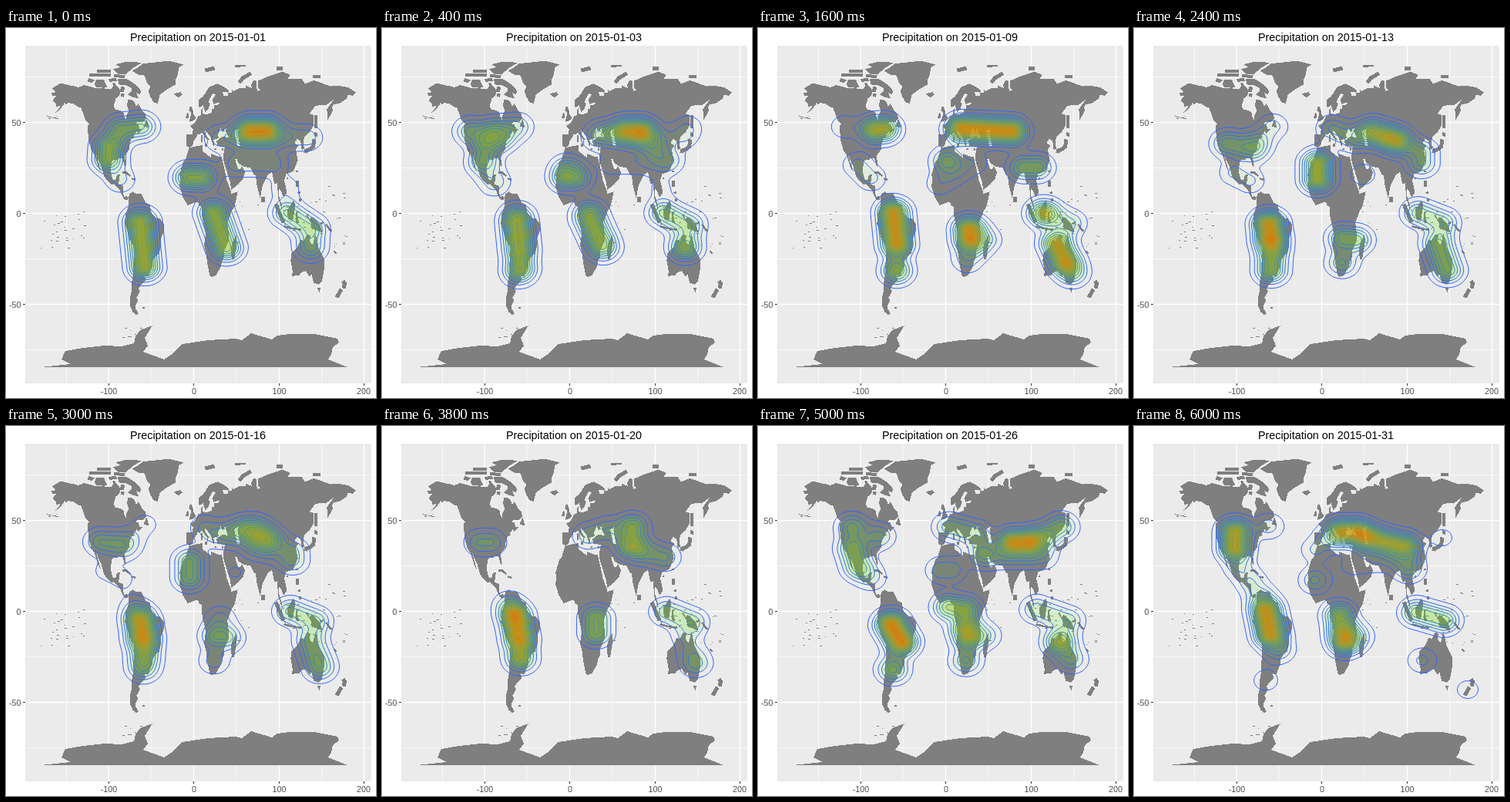
Write an HTML page with a canvas that moves like this. It is 480 by 480 pixels and loops after 6.2 s.

```html
<!DOCTYPE html>
<html lang="en">
<head>
<meta charset="utf-8">
<title>Daily precipitation</title>
<style>
html, body { margin: 0; width: 100%; height: 100%; overflow: hidden; background: #fff; }
svg, canvas { position: absolute; left: 0; top: 0; width: 480px; height: 480px; }
text { font-family: "Liberation Sans", Arial, sans-serif; }
.land { fill: #7f7f7f; shape-rendering: crispEdges; }
.sea { fill: #ebebeb; }
.isles { fill: none; stroke: #7f7f7f; shape-rendering: crispEdges; }
.isles path { vector-effect: non-scaling-stroke; }
.axis { font-size: 10.7px; fill: #4d4d4d; }
</style>
</head>
<body>
<svg viewBox="0 0 480 480">
  <rect x="25" y="23" width="449" height="438" fill="#ebebeb"/>
  <path d="M78.500 23V461M188 23V461M299 23V461M409.500 23V461M25 63.500H474M25 181.500H474M25 299.500H474M25 417.500H474" stroke="#fff" stroke-width=".7"/>
  <path d="M133 23V461M243.500 23V461M354.500 23V461M464.500 23V461M25 122.500H474M25 240.500H474M25 358.500H474" stroke="#fff" stroke-width="1.4"/>
  <path d="M133.500 461v3M243.500 461v3M354.500 461v3M464.500 461v3M22 122.500h3M22 240.500h3M22 358.500h3" stroke="#333"/>
  <g class="axis" text-anchor="middle">
    <text x="133.5" y="475">-100</text><text x="244" y="475">0</text>
    <text x="354.5" y="475">100</text><text x="464" y="475">200</text>
  </g>
  <g class="axis" text-anchor="end">
    <text x="19.5" y="126.5">50</text><text x="19.5" y="244.5">0</text><text x="19.5" y="363">-50</text>
  </g>
  <!-- land in degrees of longitude and latitude -->
  <g class="land" transform="matrix(1.105 0 0 -2.37 244 240.5)">
    <!-- Alaska -->
    <path d="M-140 69.7-145 70-156.5 71.3-163 69.5-166.5 68.4-162 66.4-168 65.7-166 64.5-161 64.4-164.5 63-166 61.5-162 60-162 58.6-157 58.7-158.5 57.5-164 54.7-158 56.5-154 59-151 61-151.5 59.2-148 60.5-140 59.8z"/>
    <!-- Canada -->
    <path d="M-141 69.7-136 69-129 70.2-115 68.5-108 68.5-97 68-96 69-94.5 70-96 71-94 72-91.5 70-88 68.5-87 67.3-85.5 69.5-82 69.5-81.5 68-83 66.3-86.5 66.3-88 64.5-92 62.8-94.5 58.7-92.500 57-88 56.500-82.500 55.200-82 53-80 51.300-79 54.300-76.500 56-78.500 58.800-78 62.400-74 62.300-70 61-68 58.500-65.500 60-64 59-61.500 56.500-57.500 54.500-56 52-60 50.200-66 50.200-69 48.500-70 47-123 47-123 49-127.500 51-130 54.500-133 58-136.500 58.300-141 59.800z"/>
    <!-- United States, Mexico, Central America -->
    <path d="M-70 48.5-65 49-64.5 46.2-60 46.3-65.5 43.6-66.5 44.5-67 45-70.5 43-70 41.8-74 40.6-76 37-75.7 35.3-81 32-81.3 30-80 26.8-80.4 25.2-81.7 26-84 30-89.5 30.2-89.3 29.2-91.5 29.5-94.5 29.5-97 28-97.7 22.3-96 19.2-94.500 18.200-92 18.600-90.500 21-87 21.500-88.800 15.900-83.300 15-83.700 11.500-82 9-79.500 9.500-77.300 8.500-78.200 7.500-80.500 7.300-83 8.400-87.500 12.900-94 16.200-97 15.800-101.500 17.700-105.500 20-109 25.700-114.800 31.700-109.500 23-112 24.700-116.800 32-120.500 34.500-124.300 40.500-124.600 48.300-122.500 49.500z"/>
    <!-- Arctic Canada, Greenland -->
    <path d="M-90 73.500-80 73.600-75 72.500-68 70.200-62 67-64 65-68 66-65 63-71 63.500-78 65-73 67-73 68.500-79 70-88 70.500zM-117 71-115 73-106 73.300-102 69-106 68.700-115 69.200zM-125 72-124 74.200-117 73-120 71.500zM-90 76.400-80 76.200-72 79.500-62 82.300-70 83.100-80 83-92 81.500-86 80-95 79z"/>
    <path d="M-73 78.2-66 79.8-60 82-45 82.7-30 83.5-12 81.5-18 80-19 76-22 73-22 70.5-33 67.5-40 65-43 60-48 61-51.5 64-53.5 67-51 69.5-55 71-58 75.5-66 76z"/>
    <!-- Iceland, Great Britain, Newfoundland -->
    <path d="M-24 65.5-16 66.4-13.7 65-18.5 63.4zM-5.500 50.100 1.300 51.200 1.600 52.700 0 53.500-2 57.600-3.200 58.600-5 58.500-6 56.500-3 54.700-4.500 53zM-10 52-6.300 52.200-6 54.500-8 55.200zM-59.300 47.600-55.800 51.500-53 47z"/>
    <!-- South America -->
    <path d="M-77.3 8.5-75.500 10.700-72 12-68 10.600-62 10.700-57 6-52 4.700-50 0-44.500-2.600-40-2.900-35-6-35-9-39-14-39-18-41-22-44.700-23.200-48.500-26-48.700-28.500-52.200-32.500-54-34.600-58-34-57-36.500-62.200-39-65-41-63.600-42.700-67.500-46-65.800-47.500-69-50.500-68.300-52.500-65.200-54.800-68-55.600-72-54-75-51-75.500-46.600-73-42-73.500-39-71.500-33-70.400-18.500-76-14-79.500-7.500-81.200-6-80.500-3-81-1-78.800 1.500-77 4z"/>
    <!-- Europe -->
    <path d="M5 62 5 59 7 58 10.5 59.3 13 55.4 16.5 57 18.7 60 17.2 61 18 62.5 22.3 65.8 25.3 65 21.4 62 23 59.900 28 60.500 38 60 38 64 34.800 64.400 33 66.600 40 66.200 41 67 36 69 28 71 18 69.300 12 65 10 63.800z"/>
    <path d="M41 64.7 41 46.8 35 46.2 36 45.2 34 44.4 31 46.600 28 43 29 41.200 22.700 40.300 24 38 22.800 36.600 19.400 41.800 13.700 45.200 12.300 45.200 12.500 44 18.400 40 16.800 40.300 15.700 38 15.800 40 10.300 43.500 8.800 44.400 6.500 43.100 3.200 43.200 3.200 41.900 0 40-2 36.800-5.500 36.100-8.900 37-9.200 43.100-1.800 43.400-1.200 46-4.700 48.200-1.500 48.700 1.500 50.200 5 53.200 8.500 53.700 8.200 56.500 10.500 57.600 10 54.700 14 54 21 55.200 21 57 24 57.200 23.500 59.200 28 59.500 36 64z"/>
    <!-- Northern Asia -->
    <path d="M40 66 44 66.2 44 68.4 46 66.800 53 68.500 60 68.500 61 69.800 68.500 68.500 66.800 70 70 73 72.800 72.800 74 67 78 67.500 75 68.800 75 72.500 87 75 104 77.600 113 75.800 110 73.800 127 73.400 130 71 141 72.800 160 69.600 170 69.800 181 69 190 66.200 186 64.400 181 65 178.500 62.600 170 60 164 59.800 162 57.800 163 56.200 156.700 51.100 156 57 164 62.400 155 59.300 142.500 59 135.500 54.700 140 53.800 140.300 48.300 135.500 44.300 131 42.800 129 41 41.500 41 37 45.200 38 47z"/>
    <!-- Middle East -->
    <path d="M41.5 43 41.5 41.5 33 42 26.2 39.500 27.500 37 36 36.500 34.200 31.200 35 28 39 22 42.700 16.500 43.400 12.800 52 16 57.500 19 59.700 22.500 56.300 26 54 24.200 51.500 24.500 48 29.800 50 30 52 27.600 58.500 25.500 66.500 25 69 43z"/>
    <!-- Southern and eastern Asia -->
    <path d="M66 43 66 25 70.500 20.800 72.700 21 73 17 77.600 8.100 80.200 15 87 21.300 91.500 22.600 94.300 16.100 97.500 16.500 98.500 11 99 8 103.500 1.400 103.400 4 99.300 10 100 13.300 102.500 12 105 8.700 109 11.500 106 18 108 21.500 116.500 23 121.800 29 119.300 35 122.500 37 118 38.500 121 40.800 125 39.600 126.500 34.500 129.300 35.500 128 39 130.500 43z"/>
    <!-- Africa, Madagascar -->
    <path d="M-6 35.8 3 36.8 10 37.3 10.2 34 15 32.3 19.5 30.5 20 32.7 29 31 32.3 31.2 37.3 21 38.500 18 43.200 12.200 44 10.700 51.200 11.900 48 4.500 44 1 39-5 40.700-11 40.500-15 35-21 35.500-24 32.800-26 31.500-29.200 25.500-34 20-34.800 18.400-34 15.300-27 14.400-22.500 11.800-17.500 13.700-11 9-1 9.500 3.500 6 4.300 4.500 6.300 1 6-7.500 4.400-13.300 9-17 14.700-16.200 19-17 21.200-13 27.800-9.800 29.800z"/>
    <path d="M44-17 49.3-12 50.3-15.500 47.200-25 44.500-25 43.400-22z"/>
    <!-- Borneo, Sulawesi, New Guinea -->
    <path d="M109 1.500 116.500 7 119 5 116-4 110.500-3zM119-3 120 .8 125 1.500 121 0 123-5 120.300-5.600zM131-1 134-.8 135-3.300 138-1.700 147.500-6 150.700-10.500 138-8.300 138-5.700z"/>
    <!-- Australia, Tasmania -->
    <path d="M114-22 122-18 125-14.500 129-14.900 132.600-11.400 136.700-12.200 135.500-15 139.300-17.500 142.400-10.800 146.300-19 153-25.300 153.400-29 150-37.400 146.500-39 140.500-38 137.800-33 135.700-34.800 131-31.500 126-32.300 123.500-33.900 115-34.300 115.700-31.700 113.500-26zM144.700-40.800 148.300-40.900 147-43.500z"/>
    <path class="sea" d="M47 45 53 46.600 51 44.500 54 37 50.500 37 49 41z"/>
  </g>
  <!-- long narrow islands, drawn as strokes -->
  <g class="isles" transform="matrix(1.105 0 0 -2.37 244 240.5)">
    <path stroke-width="5" d="M131 33 131.500 34.300 136 35.200 140 36.500 141 40.500M141 43.300 145 43.200M175 -37 177 -38.500 175.500 -41M173 -41.500 167.500 -46M96 5 105 -5M53 71.500 57 74 67 76.700M13 78.300 24 79.500M97 79.300 104 79.300M80.700 9 80.700 6.300"/>
    <path stroke-width="4" d="M-123 75.800-98 75.700M-94 75.200-81 75M-100 72.700-91 73.400M-114 78-98 78M-86 64.800-82 64.500M121 18 121.500 14.500M123 7.500 126 7.500M139 75 148 75M142.800 54 142.800 46.500M12.500 37.500 15.500 37.500"/>
    <path stroke-width="2.5" d="M105.500 -7 114.500 -8.200 126 -9M-84.500 22.300-80 22.500-75 20.400M-73.500 19-69 18.500M148.500 -5.800 152 -4.500M155 -6 161 -10M164 -20.500 167 -22M9 42.800 9 39M24 35.300 26 35.200M32.500 35 34.300 35M121 23.500 121 22.500M109 19.200 110.500 19.200M122 11 125 11.500M-61 -51.700-58 -51.700M48 80.600 61 80.800"/>
  </g>
  <path id="specks" class="isles"/>
  <!-- Antarctica -->
  <path class="land" d="M45 440 84 436 72 430 77 419 100 415 128 412 150 413 166 409 168 400 174 392 190 386 180 402 184 412 178 420 205 430 214 424 229 410 262 405 298 403 306 405 318 396 345 404 352 399 368 397 400 397 430 403 432 408 424 414 422 423 418 430 443 440z"/>
  <text id="title" x="249" y="17" font-size="14.33" text-anchor="middle">Precipitation on 2015-01-01</text>
</svg>
<canvas id="rain" width="480" height="480"></canvas>
<script>
const STEP = 2, X0 = 70, Y0 = 86, W = 196, H = 144, DAYS = 31, DAY_MS = 200;
const SPREAD_X = 13, SPREAD_Y = 11, FIRST_LEVEL = 0.7;
const ctx = document.getElementById('rain').getContext('2d');
const title = document.getElementById('title');
const keys = [];

const mix = (a, b, u) => a + (b - a) * u;
const clamp = u => Math.min(1, Math.max(0, u));
const peak = field => field.reduce((a, b) => Math.max(a, b), 0);

// Small islands, strewn over a box.
let seed = 7;
const random = () => (seed = seed * 16807 % 2147483647) / 2147483647;
function scatter(x, y, w, h, n) {
  return Array.from({ length: n }, () =>
    `M${Math.round(x + random() * w)} ${Math.floor(y + random() * h)}.5h${1 + Math.floor(random() * 3)}`).join('');
}
document.getElementById('specks').setAttribute('d',
  scatter(45, 235, 60, 55, 26) + scatter(395, 205, 48, 85, 26) + scatter(358, 225, 45, 38, 24) +
  scatter(292, 225, 34, 66, 9) + scatter(45, 112, 22, 7, 9) + scatter(148, 385, 30, 18, 8));

// Rain on one day: every band is a height in contour levels and the line it lies along.
function key(day, ...bands) {
  const field = new Float32Array(W * H);
  for (const [top, x1, y1, x2 = x1, y2 = y1] of bands) {
    const dx = (x2 - x1) / SPREAD_X, dy = (y2 - y1) / SPREAD_Y, len = dx * dx + dy * dy || 1;
    field.forEach((_, p) => {
      const x = (X0 + STEP * (p % W) - x1) / SPREAD_X;
      const y = (Y0 + STEP * Math.floor(p / W) - y1) / SPREAD_Y;
      const u = clamp((x * dx + y * dy) / len);
      field[p] += top * Math.exp(-((x - u * dx) ** 2 + (y - u * dy) ** 2) / 2);
    });
  }
  keys.push({ day, field, max: peak(field) });
}

key(1, [11, 318, 133, 336, 133], [2.5, 278, 143, 390, 142], [2.5, 300, 176, 345, 176], [1.6, 362, 208],
  [7, 134, 155, 133, 170], [5, 150, 131, 175, 128], [2, 148, 197], [7, 238, 194, 252, 194],
  [8.5, 174, 252, 180, 310], [7.5, 270, 240, 286, 285], [5, 365, 240, 395, 260], [4, 395, 285]);
key(6, [10, 115, 134, 155, 143], [3.5, 128, 180, 144, 202], [8, 240, 182, 241, 190], [8, 287, 136, 330, 133],
  [8, 340, 143, 370, 172], [3.5, 397, 128], [9, 176, 245, 180, 285], [7.5, 177, 318],
  [7.5, 266, 248, 282, 275], [2, 292, 286], [5.5, 367, 240, 400, 252], [10, 392, 285]);
key(9, [8, 153, 132, 163, 131], [1.6, 112, 128], [2.2, 130, 178, 146, 194], [10.5, 265, 131, 328, 134],
  [4.5, 345, 181, 362, 181], [4, 245, 172], [1.6, 236, 202, 280, 175], [10, 176, 240, 180, 280], [6, 180, 315],
  [10, 274, 262, 275, 272], [2.5, 272, 300, 295, 275], [6, 369, 240], [3, 380, 243, 405, 253], [9, 388, 280, 398, 302], [4, 408, 318]);
key(13, [4.5, 122, 150, 154, 157], [2.2, 165, 143, 180, 128], [2, 130, 188, 150, 198], [8.5, 238, 176, 238, 196],
  [8, 310, 135, 342, 147], [3, 334, 143], [3, 258, 131, 285, 143], [4, 373, 162, 373, 175], [1.4, 297, 190],
  [12, 175, 255, 177, 270], [7, 179, 290, 178, 314], [5.5, 272, 273, 288, 275], [3.8, 270, 305],
  [4.5, 369, 240, 400, 252], [6, 395, 280, 407, 314]);
key(20, [2.9, 128, 151, 140, 151], [2.6, 268, 142, 290, 135], [5, 325, 131, 322, 154], [3, 340, 163, 366, 170],
  [8.5, 173, 248, 178, 275], [5.5, 180, 302], [2.5, 165, 232], [4.8, 278, 250, 278, 268],
  [3.5, 369, 241, 402, 254], [1.8, 395, 275, 407, 308], [1.6, 407, 306]);
key(26, [5.5, 123, 160, 130, 182], [4, 122, 131], [3, 157, 143], [2, 147, 197], [3.5, 248, 131, 282, 140],
  [2.6, 290, 165], [2.6, 238, 187, 250, 187], [10, 332, 151, 350, 151], [4.5, 375, 142, 393, 131], [2, 300, 170, 370, 170],
  [11, 173, 258, 186, 280], [5, 175, 316], [8, 270, 266, 272, 272], [6, 248, 235, 268, 238], [3.8, 270, 305], [2.5, 295, 272],
  [3.5, 362, 238, 402, 252], [7, 392, 280], [3, 407, 303]);
key(31, [10, 131, 138, 131, 158], [2.2, 175, 130], [2.6, 138, 185, 150, 200], [11, 270, 138, 288, 138],
  [9, 310, 147, 350, 156], [3.5, 357, 185], [2, 246, 150, 236, 160], [1.4, 285, 180, 330, 175], [3, 235, 200],
  [1.1, 400, 145], [9, 171, 240, 176, 270], [3, 165, 222, 188, 290], [1.4, 171, 330],
  [7, 266, 246, 274, 280], [4.5, 273, 275], [2, 292, 272], [5.5, 367, 242, 402, 252], [2, 374, 304], [1.2, 433, 342]);

function fieldOn(day) {
  const n = Math.max(1, keys.findIndex(k => k.day >= day));
  const a = keys[n - 1], b = keys[n], u = (day - a.day) / (b.day - a.day);
  const field = a.field.map((v, i) => mix(v, b.field[i], u));
  const scale = mix(a.max, b.max, u) / peak(field);
  return field.map(v => v * scale);
}

// Closed outlines of the region above a level, joined cell by cell.
function contour(field, level) {
  const next = new Map(), path = new Path2D();
  for (let j = 0; j < H - 1; j++) for (let i = 0; i < W - 1; i++) {
    const p = j * W + i;
    const inside = [p, p + 1, p + W + 1, p + W].map(q => field[q] >= level);
    if (inside.every(v => v === inside[0])) continue;
    const edges = [2 * p, 2 * (p + 1) + 1, 2 * (p + W), 2 * p + 1];
    for (let e = 0; e < 4; e++) {
      if (!inside[e] || inside[(e + 1) % 4]) continue;
      let f = (e + 1) % 4;
      while (inside[f] || !inside[(f + 1) % 4]) f = (f + 1) % 4;
      next.set(edges[e], edges[f]);
    }
  }
  const point = edge => {
    const p = edge >> 1, down = edge & 1, q = p + (down ? W : 1);
    const u = (level - field[p]) / (field[q] - field[p]);
    return [X0 + STEP * (p % W + (down ? 0 : u)), Y0 + STEP * (Math.floor(p / W) + (down ? u : 0))];
  };
  while (next.size) {
    let edge = next.keys().next().value;
    path.moveTo(...point(edge));
    while (next.has(edge)) {
      const to = next.get(edge);
      next.delete(edge);
      edge = to;
      path.lineTo(...point(edge));
    }
    path.closePath();
  }
  return path;
}

// Green through olive to orange, denser with height.
function tint(u, count) {
  const red = 240 * (1 - (1 - u) ** 2), green = 255 - 155 * u;
  return `rgba(${Math.round(red)},${Math.round(green)},0,${3.2 / count * u ** 0.7})`;
}

const cache = {};
function outlines(day) {
  if (!cache[day]) {
    const field = fieldOn(day), count = Math.floor(peak(field) - FIRST_LEVEL) + 1;
    cache[day] = Array.from({ length: count }, (_, i) => contour(field, i + FIRST_LEVEL));
  }
  return cache[day];
}

let shown = 0;
function draw(now) {
  const day = 1 + Math.floor(now / DAY_MS) % DAYS;
  if (day === shown) return;
  shown = day;
  title.textContent = 'Precipitation on 2015-01-' + String(day).padStart(2, '0');
  const paths = outlines(day);
  ctx.clearRect(0, 0, 480, 480);
  ctx.strokeStyle = '#36f';
  paths.forEach(p => ctx.stroke(p));
  paths.forEach((p, i) => {
    ctx.fillStyle = tint(i / (paths.length - 1), paths.length);
    ctx.fill(p, 'evenodd');
  });
}

const start = performance.now();
function tick() {
  draw(performance.now() - start);
  requestAnimationFrame(tick);
}
tick();
</script>
</body>
</html>
```
